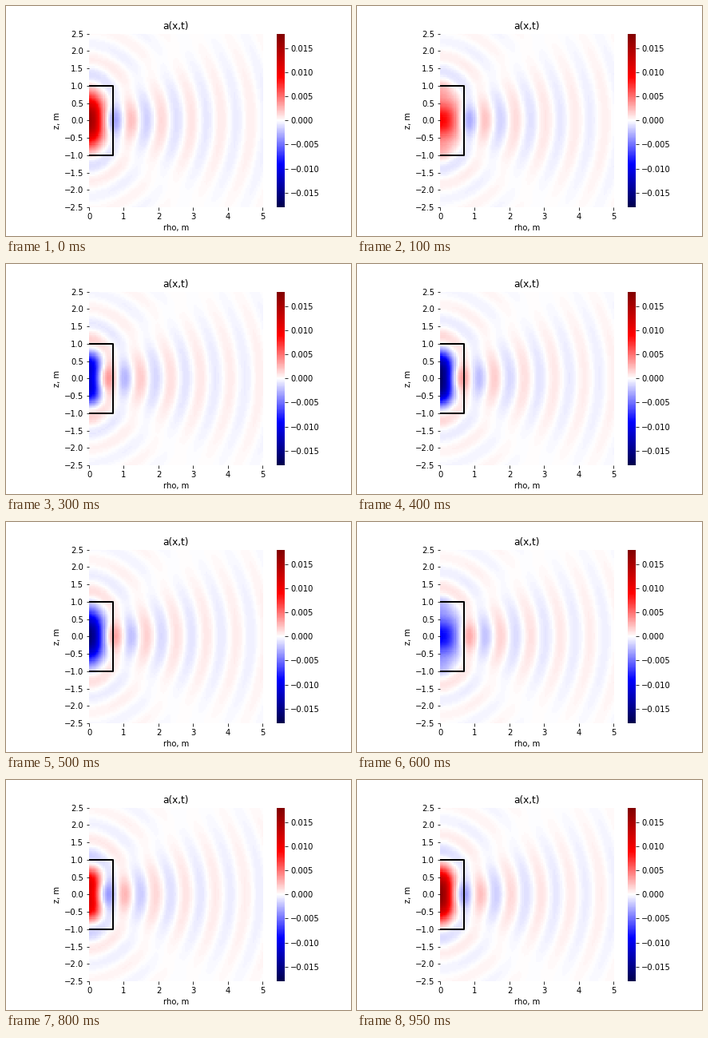
Recreate the animation shown at these times as a matplotlib script. Size 432x288 px, loop 1000 ms.

```python
import numpy as np
import matplotlib.pyplot as plt
from matplotlib.animation import FuncAnimation

W, H, DPI = 432, 288, 72
FRAMES, INTERVAL = 20, 50
RADIUS, HALF_LENGTH = 0.7, 1.0
WAVENUMBER = 7.4
PEAK, LIMIT = 0.0172, 0.018
STEP = 0.05


def radiated_field():
    """Complex amplitude of the wave sent out by a source filling the cylinder."""
    rho = (np.arange(100) + 0.5) * STEP
    z = (np.arange(100) - 49.5) * STEP
    src_rho = np.arange(15) * STEP
    src_z = np.arange(-20, 21) * STEP
    radial = src_rho * np.clip(1 - (src_rho / RADIUS) ** 2, 0, None) ** 2
    axial = np.cos(np.pi * src_z / (2 * HALF_LENGTH))

    # Ring kernel, summed over azimuth; the half-cell offset avoids r = 0.
    dz = (np.arange(70) + 0.5) * STEP
    a, b, d = rho[:, None, None], src_rho[None, None, :], dz[None, :, None]
    kernel = np.zeros((len(rho), len(dz)), complex)
    for phi in (np.arange(64) + 0.5) * np.pi / 64:
        r = np.sqrt(a**2 + b**2 - 2 * a * b * np.cos(phi) + d**2)
        kernel += (np.exp(1j * WAVENUMBER * r) / r) @ radial

    offset = (np.abs(z[:, None] - src_z) / STEP).astype(int)
    field = -(kernel[:, offset] @ axial).T
    return PEAK * field / np.abs(field[49, 0])


def add_axes(left, bottom, width, height):
    return fig.add_axes([left / W, bottom / H, width / W, height / H])


def hide_spines(axes):
    for spine in axes.spines.values():
        spine.set_visible(False)


amplitude = radiated_field()


def snapshot(frame):
    return np.real(amplitude * np.exp(-2j * np.pi * frame / FRAMES))


plt.rcParams["font.family"] = "DejaVu Sans"
fig = plt.figure(figsize=(W / DPI, H / DPI), dpi=DPI, facecolor="white")

ax = add_axes(104, 36, 217.4, 217.4)
image = ax.imshow(snapshot(0), cmap="seismic", vmin=-LIMIT, vmax=LIMIT,
                  extent=(0, 5, -2.5, 2.5), origin="lower",
                  interpolation="nearest", aspect="auto")
ax.plot([0, RADIUS, RADIUS, 0],
        [HALF_LENGTH, HALF_LENGTH, -HALF_LENGTH, -HALF_LENGTH],
        color="black", lw=2)
ax.set(xlim=(0, 5), ylim=(-2.5, 2.5), xticks=np.arange(6),
       yticks=np.arange(-5, 6) / 2, xlabel="rho, m", ylabel="z, m",
       title="a(x,t)")
hide_spines(ax)

bar_ax = add_axes(338.7, 36, 10.6, 217.4)
bar = fig.colorbar(image, cax=bar_ax, ticks=np.arange(-3, 4) * 0.005)
bar.outline.set_visible(False)


def update(frame):
    image.set_data(snapshot(frame))
    return [image]


anim = FuncAnimation(fig, update, frames=FRAMES, interval=INTERVAL,
                     repeat=True, repeat_delay=0)
plt.show()
```
